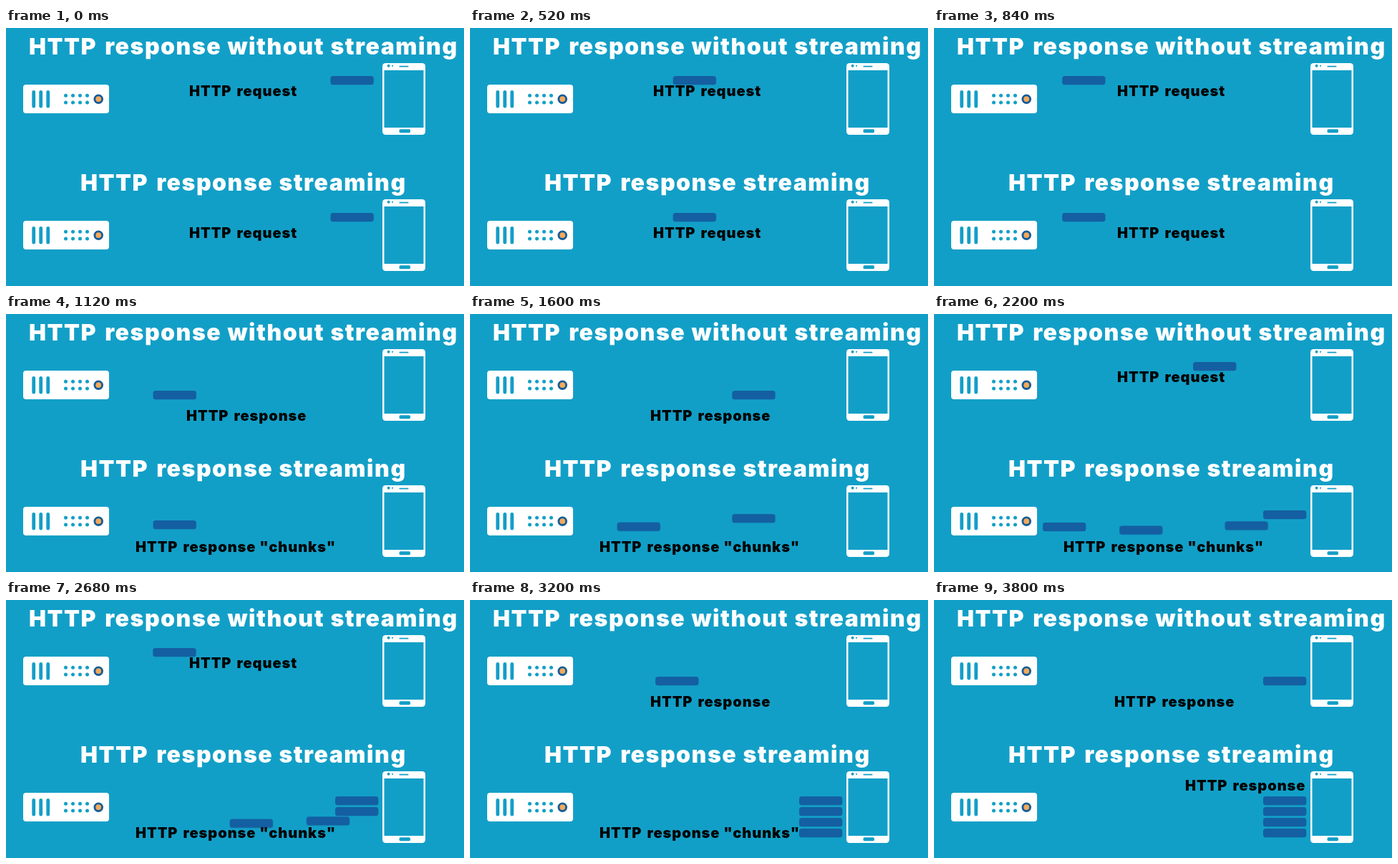
Animation of 640 by 360 pixels, one loop 6.72 s. Source, as an HTML page:

```html
<!DOCTYPE html>
<html lang="en">
<head>
<meta charset="utf-8">
<title>HTTP response streaming</title>
<style>
  html, body { margin: 0; width: 100%; height: 100%; overflow: hidden; background: #129fc7; }
  svg { display: block; width: 100%; height: 100%; }
  text { font: 900 20px Inter, "Open Sans", sans-serif; font-optical-sizing: none; letter-spacing: .048em; }
  .title { font-size: 32px; fill: #fff; }

  /* Everything shares one 6.72 s clock; moves advance every 40 ms. */
  .bar, .label { animation: 6720ms step-end infinite; }
  .bar { fill: #145fa1; }

  #exchange { animation-name: exchange; }
  #query { animation-name: query; }
  #chunk1 { animation-name: chunk1; }
  #chunk2 { animation-name: chunk2; }
  #chunk3 { animation-name: chunk3; }
  #chunk4 { animation-name: chunk4; }
  #askTop { animation-name: ask-top; }
  #answerTop { animation-name: answer-top; }
  #askBottom { animation-name: ask-bottom; }
  #chunkLabel { animation-name: chunk-label; }
  #done { animation-name: done; }

  @keyframes exchange {
    0%, 28.571% { transform: translate(453.5px, 67px); animation-timing-function: steps(23); }
    13.69%, 42.261% { transform: translate(153px, 67px); }
    14.285%, 42.857% { transform: translate(152px, 107px); animation-timing-function: steps(23); }
    27.976%, 56.547%, 100% { transform: translate(460px, 107px); }
  }
  @keyframes query {
    0% { transform: translate(453.5px, 258px); opacity: 1; animation-timing-function: steps(23); }
    13.69% { transform: translate(153px, 258px); opacity: 1; }
    14.285%, 100% { transform: translate(153px, 258px); opacity: 0; }
  }
  @keyframes chunk1 {
    0% { transform: translate(152px, 291px); opacity: 0; }
    14.285% { transform: translate(152px, 291px); opacity: 1; animation-timing-function: steps(23); }
    27.976%, 100% { transform: translate(460px, 274px); opacity: 1; }
  }
  @keyframes chunk2 {
    0% { transform: translate(152px, 291px); opacity: 0; }
    21.428% { transform: translate(152px, 291px); opacity: 1; animation-timing-function: steps(23); }
    35.119%, 100% { transform: translate(460px, 289px); opacity: 1; }
  }
  @keyframes chunk3 {
    0% { transform: translate(152px, 291px); opacity: 0; }
    27.976% { transform: translate(152px, 291px); opacity: 1; animation-timing-function: steps(23); }
    41.666%, 100% { transform: translate(460px, 304px); opacity: 1; }
  }
  @keyframes chunk4 {
    0% { transform: translate(152px, 291px); opacity: 0; }
    32.738% { transform: translate(152px, 291px); opacity: 1; animation-timing-function: steps(23); }
    46.428%, 100% { transform: translate(460px, 319px); opacity: 1; }
  }
  @keyframes ask-top {
    0%, 28.571% { opacity: 1; }
    14.285%, 42.857%, 100% { opacity: 0; }
  }
  @keyframes answer-top {
    0%, 28.571% { opacity: 0; }
    14.285%, 42.857%, 100% { opacity: 1; }
  }
  @keyframes ask-bottom {
    0% { opacity: 1; }
    14.285%, 100% { opacity: 0; }
  }
  @keyframes chunk-label {
    0%, 54.166%, 100% { opacity: 0; }
    14.285% { opacity: 1; }
  }
  @keyframes done {
    0% { opacity: 0; }
    54.166%, 100% { opacity: 1; }
  }
</style>
</head>
<body>
<svg viewBox="0 0 640 360">
  <defs>
    <g id="devices">
      <rect x="24" y="79" width="120" height="40" rx="4" fill="#fff"/>
      <g fill="none" stroke="#129fc7" stroke-linecap="round">
        <path d="M38.7 89.3V109.2M48.7 89.3V109.2M58.7 89.3V109.2" stroke-width="4.8"/>
        <path d="M83.5 94.2h0m10 0h0m10 0h0m10 0h0M83.5 104.1h0m10 0h0m10 0h0m10 0h0" stroke-width="5"/>
      </g>
      <circle cx="129.2" cy="99.2" r="5.3" fill="#f6a95b" stroke="#155c96" stroke-width="2.9"/>

      <rect x="526" y="49" width="60" height="100" rx="4.5" fill="#fff"/>
      <g fill="#129fc7">
        <rect x="528.5" y="59" width="55" height="80"/>
        <rect x="549.5" y="52.8" width="13" height="1.8" rx=".9"/>
        <rect x="549.5" y="141.3" width="15.5" height="5" rx="1.8"/>
        <circle cx="534.6" cy="52.8" r="2"/>
        <circle cx="540" cy="52.8" r="1.1"/>
      </g>
    </g>
    <rect id="block" width="60.3" height="12.3" rx="3.6"/>
  </defs>

  <rect width="640" height="360" fill="#129fc7"/>
  <use href="#devices"/>
  <use href="#devices" y="190"/>

  <text class="title" y="37"><tspan x="32">HTTP </tspan><tspan x="138.2">response </tspan><tspan x="309.4">without </tspan><tspan x="453.4">streaming</tspan></text>
  <text class="title" y="227"><tspan x="104">HTTP </tspan><tspan x="210.2">response </tspan><tspan x="381.4">streaming</tspan></text>

  <g class="bar" id="exchange"><use href="#block"/></g>
  <g class="bar" id="query"><use href="#block"/></g>
  <g class="bar" id="chunk1"><use href="#block"/></g>
  <g class="bar" id="chunk2"><use href="#block"/></g>
  <g class="bar" id="chunk3"><use href="#block"/></g>
  <g class="bar" id="chunk4"><use href="#block"/></g>

  <text class="label" id="askTop" y="95"><tspan x="256">HTTP </tspan><tspan x="322.5">request</tspan></text>
  <text class="label" id="answerTop" y="149"><tspan x="252">HTTP </tspan><tspan x="318.5">response</tspan></text>
  <text class="label" id="askBottom" y="293"><tspan x="256">HTTP </tspan><tspan x="322.5">request</tspan></text>
  <text class="label" id="chunkLabel" y="332"><tspan x="181">HTTP </tspan><tspan x="247.5">response </tspan><tspan x="354.3">"chunks"</tspan></text>
  <text class="label" id="done" y="266"><tspan x="351">HTTP </tspan><tspan x="417.5">response</tspan></text>
</svg>
</body>
</html>
```
